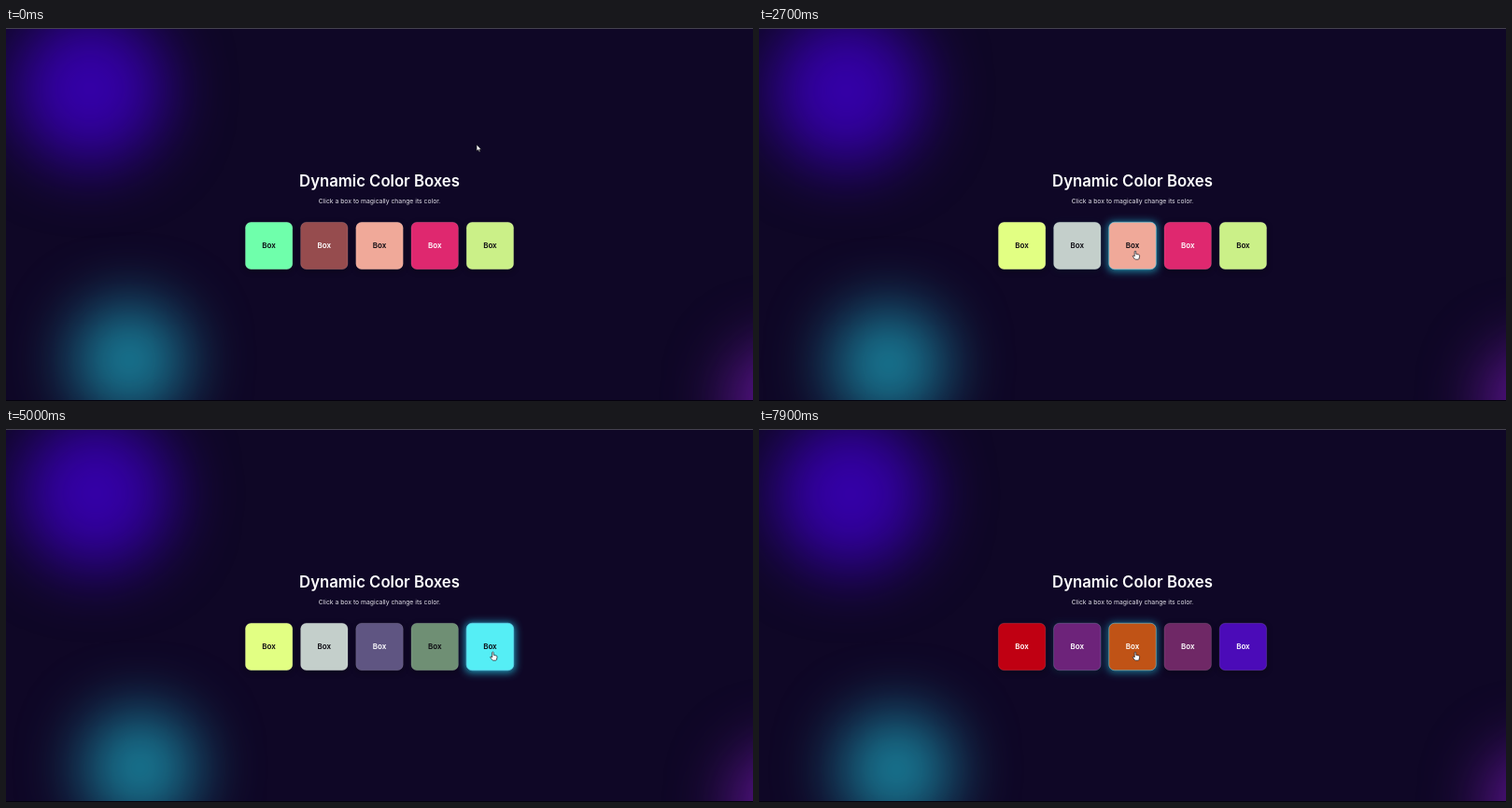
Animation of 800x400 px, one loop 8 s. Source, as an HTML page:

```html
<!DOCTYPE html>
<html lang="en">
<head>
<meta charset="utf-8">
<title>Dynamic Color Boxes</title>
<style>
  html, body { margin: 0; width: 100%; height: 100%; overflow: hidden; background: #0f0726; }
  svg { display: block; width: 800px; height: 400px; font-family: Inter, "Open Sans", sans-serif; }
  text { text-anchor: middle; fill: #fff; }
  .title { font-size: 16.7px; font-weight: 600; }
  .hint { font-size: 6.8px; fill: #e4e2ea; }
  .label { font-size: 8px; font-weight: 600; }
  .blob { filter: blur(34px); }
  .shade { filter: blur(3px); fill: #000; opacity: .3; }
  .glow { filter: blur(4.5px); fill: #25b5d8; }
  .face { stroke: #fff; stroke-opacity: .12; }
  .rim { fill: none; stroke: #54cdea; }
  .pointer { fill: #fff; stroke: #15131c; stroke-width: .7; stroke-linejoin: round; }
</style>
</head>
<body>
<svg viewBox="0 0 800 400">
  <rect width="800" height="400" fill="#0f0726"/>
  <circle class="blob" cx="90" cy="65" r="82" fill="#3500a9"/>
  <circle class="blob" cx="132" cy="356" r="60" fill="#19839d"/>
  <circle class="blob" cx="836" cy="400" r="60" fill="#64159a"/>
  <path d="M0 .5H800" stroke="#45424f"/>
  <path d="M0 399.5H800" stroke="#05020e"/>
  <text class="title" x="400" y="169.9">Dynamic Color Boxes</text>
  <text class="hint" x="400" y="188.3">Click a box to magically change its color.</text>
  <g id="boxes"></g>
  <path id="arrow" class="pointer" d="M0 0V7L1.7 5.6L2.8 8L4 7.4L2.9 5.2H5Z"/>
  <path id="hand" class="pointer" d="M-.8 .6Q0-.5 .8 .6V3.4L3.6 4Q4.8 4.3 4.6 5.6L4 8.4Q3.8 9.2 3 9.2H.3Q-.4 9.2-.9 8.4L-2.8 5.8Q-2.6 4.6-1.5 5.3L-.8 6Z"/>
</svg>
<script>
const LOOP = 8000, HOP = 400, CLICK = 150, FADE = 300, HOVER = 400;
const SIZE = 51.5, STEP = 59.2, MIDDLE = 233.5, TOP = MIDDLE - SIZE / 2;
const startColors = ['#6fffab', '#964c4e', '#f0a999', '#df286f', '#cbf088'];

// The pointer reaches each box in turn and clicks it into a new color
const visits = [
  { at: 900, box: 0, color: '#e2ff83' },
  { at: 1800, box: 1, color: '#c4cfcb' },
  { at: 2600, box: 2, color: '#5f5582' },
  { at: 3700, box: 3, color: '#6f8f74' },
  { at: 4550, box: 4, color: '#55eef5' },
  { at: 5100, box: 4, color: '#4b0bb8' },
  { at: 5550, box: 3, color: '#6f2866' },
  { at: 6000, box: 2, color: '#c05316' },
  { at: 6450, box: 1, color: '#8a4b28' },
  { at: 7050, box: 0, color: '#c00012' },
  { at: 7450, box: 1, color: '#6d237a' },
  { at: 7850, box: 2, color: '#c05316' }
];

const clamp = v => Math.min(1, Math.max(0, v));
const smooth = v => v * v * (3 - 2 * v);
const mix = (a, b, k) => a + (b - a) * k;
const rgb = hex => [1, 3, 5].map(i => parseInt(hex.slice(i, i + 2), 16));
const centerX = i => 400 + (i - 2) * STEP;

function pointerAt(t) {
  let x = 504, y = 125;
  for (const { at, box } of visits) {
    const k = smooth(clamp((t - at + HOP) / HOP));
    x = mix(x, centerX(box) + 3, k);
    y = mix(y, 239, k);
  }
  return [x, y];
}

function boxUnder([x, y]) {
  if (Math.abs(y - MIDDLE) > SIZE / 2) return -1;
  return startColors.findIndex((_, i) => Math.abs(x - centerX(i)) <= SIZE / 2);
}

// Share of the recent past that the pointer spent over the box
function glowAt(i, t) {
  let hits = 0;
  for (let k = 0; k < 20; k++) hits += boxUnder(pointerAt(t - k * HOVER / 20)) === i;
  return smooth(hits / 20);
}

function paintAt(i, t) {
  let face = rgb(startColors[i]), latest = face;
  for (const { at, box, color } of visits) {
    const age = t - at - CLICK;
    if (box !== i || age < 0) continue;
    latest = rgb(color);
    const k = smooth(clamp(age / FADE));
    face = face.map((c, j) => mix(c, latest[j], k));
  }
  const [r, g, b] = latest;
  return {
    face: `rgb(${face.map(Math.round)})`,
    label: r * .299 + g * .587 + b * .114 > 125 ? '#0b0910' : '#fff'
  };
}

const rect = (cls, i, y, size) =>
  `<rect class="${cls}" x="${centerX(i) - size / 2}" y="${y}" width="${size}" height="${size}" rx="6"/>`;
const group = document.getElementById('boxes');
group.innerHTML = startColors.map((_, i) => '<g>' +
  rect('shade', i, TOP + 2, SIZE) + rect('glow', i, TOP, SIZE + 2) +
  rect('face', i, TOP + .5, SIZE - 1) + rect('rim', i, TOP + .5, SIZE - 1) +
  `<text class="label" x="${centerX(i)}" y="236.4">Box</text></g>`).join('');

const boxes = [...group.children].map(g => ({
  glow: g.querySelector('.glow'), face: g.querySelector('.face'),
  rim: g.querySelector('.rim'), label: g.querySelector('text')
}));
const blobs = document.querySelectorAll('.blob');
const arrow = document.getElementById('arrow'), hand = document.getElementById('hand');

function draw(t) {
  // The lights drift right and down, each slower than the one before
  const drift = 1 - (1 - t / LOOP) ** 1.5;
  const reach = [8, 15, 4];
  blobs.forEach((blob, i) =>
    blob.setAttribute('transform', `translate(${reach[i] * drift} ${reach[i] * drift * .6})`));

  boxes.forEach((box, i) => {
    const glow = glowAt(i, t), paint = paintAt(i, t);
    box.glow.style.opacity = glow * .85;
    box.rim.style.opacity = glow * .6;
    box.face.style.fill = paint.face;
    box.label.style.fill = paint.label;
  });

  const at = pointerAt(t), over = boxUnder(at) >= 0;
  for (const [el, shown] of [[arrow, !over], [hand, over]]) {
    el.setAttribute('transform', `translate(${at})`);
    el.style.display = shown ? '' : 'none';
  }
}

const start = performance.now();
function tick() {
  const t = (performance.now() - start) % LOOP;
  draw(Math.floor(t / 100) * 100);
  requestAnimationFrame(tick);
}
tick();
</script>
</body>
</html>
```
